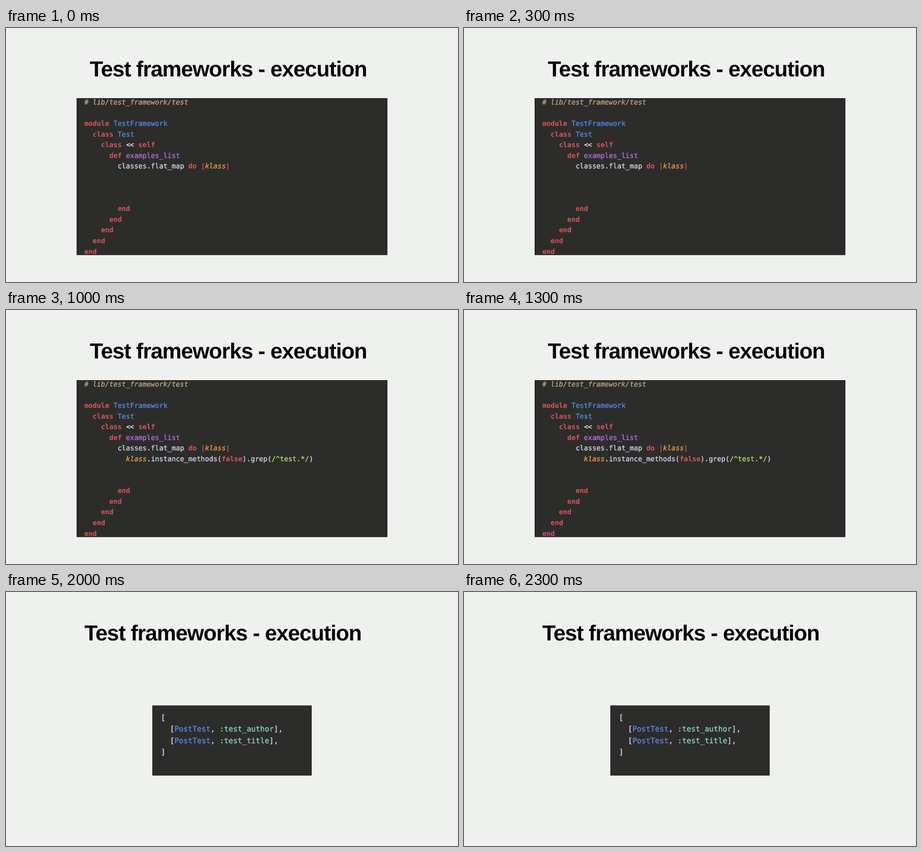
Write an HTML page that moves like this. It is 998 px wide and 561 px high and loops after 2500 ms.

```html
<!DOCTYPE html>
<html lang="en">
<head>
<meta charset="utf-8">
<title>Test frameworks - execution</title>
<style>
  html, body { margin: 0; width: 100%; height: 100%; overflow: hidden; background: #eff1ef; }
  svg { display: block; width: 998px; height: 561px; }
  text { text-rendering: geometricPrecision; }
  .title { font: bold 48px "Liberation Sans", Arial, sans-serif; letter-spacing: -1.22px; fill: #070807; }
  .code text {
    font-family: "DejaVu Sans Mono", monospace;
    color: #d8d8ec; fill: currentColor; stroke: currentColor; stroke-width: .35px;
  }
  .code .k { color: #d8545a; font-weight: bold; stroke: none; }
  .code .c { color: #c0a880; font-style: italic; }
  .code .t { color: #5a8ae4; }
  .code .f { color: #b970e0; }
  .code .v { color: #f0a044; font-style: italic; }
  .code .r { color: #b8e06c; }
  .code .s { color: #90d2bf; }
  .code .o { color: #ececf2; letter-spacing: -1px; transform: translateX(.5px); }
</style>
</head>
<body>
<svg viewBox="0 0 998 561">
  <rect width="998" height="561" fill="#eff1ef"/>
  <text id="title" class="title" y="107">Test frameworks - execution</text>
  <g id="method" class="code">
    <rect x="156.5" y="155.5" width="685" height="345.5" fill="#2c2d2b" stroke="#0c0d0c"/>
  </g>
  <g id="output" class="code">
    <rect x="323" y="250.5" width="352" height="155" fill="#2c2d2b"/>
  </g>
</svg>
<script>
const STEP = 500, STEPS = 5, EM = 0.60205;
const $ = id => document.getElementById(id);
const title = $('title'), method = $('method'), output = $('output');

// [row, column, first step shown, text]; {x word} colours a word with class x
const methodCode = [
  [0, 0, 0, '{c # lib/test_framework/test}'],
  [2, 0, 0, '{k module} {t TestFramework}'],
  [3, 2, 0, '{k class} {t Test}'],
  [4, 4, 0, '{k class} {o <<} {k self}'],
  [5, 6, 0, '{k def} {f examples_list}'],
  [6, 8, 0, 'classes.flat_map {k do} {k |}{v klass}{k |}'],
  [7, 10, 1, '{v klass}.instance_methods({k false})'],
  [7, 39, 2, '.grep({r /^test.*/})'],
  [7, 55, 3, '.map {k do} {k |}{v test}{k |}'],
  [8, 12, 3, '[{v klass}, {v test}]'],
  [9, 10, 3, '{k end}'],
  ...[8, 6, 4, 2, 0].map((col, i) => [10 + i, col, 0, '{k end}'])
];
const outputCode = [
  [0, 0, 4, '['],
  [1, 2, 4, '[{t PostTest}, {s :test_author}],'],
  [2, 2, 4, '[{t PostTest}, {s :test_title}],'],
  [3, 0, 4, ']']
];

function add(parent, name, attrs, content = '') {
  const el = document.createElementNS('http://www.w3.org/2000/svg', name);
  for (const key in attrs) el.setAttribute(key, attrs[key]);
  el.textContent = content;
  return parent.appendChild(el);
}

function typeset(parent, lines, x, y, pitch, leading) {
  return lines.map(([row, col, from, source]) => {
    const el = add(parent, 'g', { 'font-size': pitch / EM });
    for (const [all, kind, word] of source.matchAll(/\{(\w) ([^}]*)\}|[^{]+/g)) {
      const run = word || all;
      const lead = run.length - run.trimStart().length;
      if (run.trim()) {
        add(el, 'text', {
          class: kind || 'p',
          x: x + (col + lead) * pitch,
          y: y + row * leading
        }, run.trim());
      }
      col += run.length;
    }
    return { el, from };
  });
}

const parts = [
  ...typeset(method, methodCode, 172.9, 169, 9.19, 23.54),
  ...typeset(output, outputCode, 342, 282.6, 9.97, 25.6)
];

const show = (el, on) => el.setAttribute('display', on ? 'inline' : 'none');

function draw(ms) {
  const step = Math.floor(ms / STEP) % STEPS;
  const last = step === STEPS - 1;
  title.setAttribute('x', last ? 173 : 185);
  show(method, !last);
  show(output, last);
  for (const { el, from } of parts) show(el, step >= from);
}

function tick() {
  draw(performance.now());
  requestAnimationFrame(tick);
}
tick();
</script>
</body>
</html>
```
